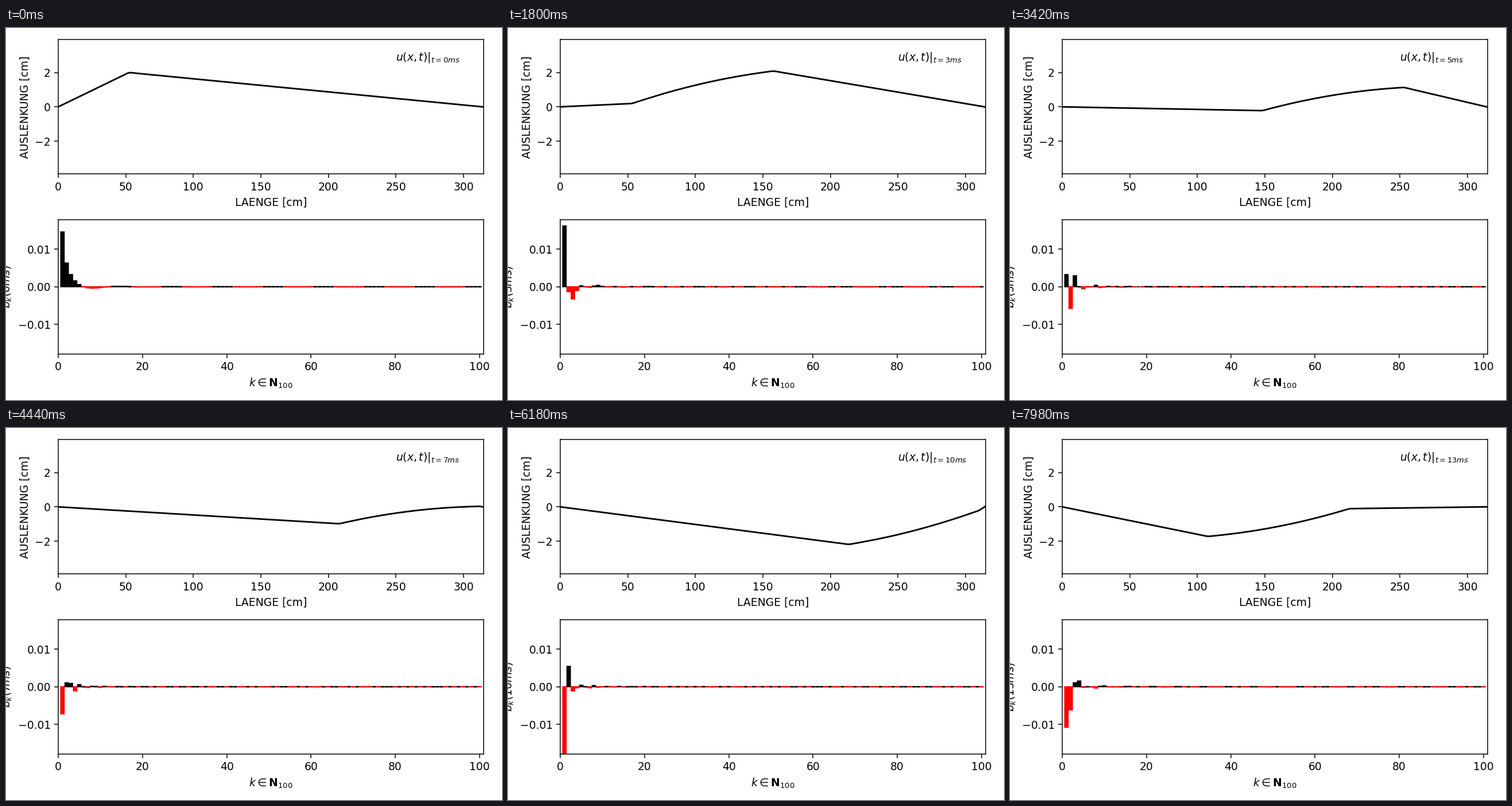
These frames come from a looping animation (864x648 px, 8 s). A matplotlib script:

```python
import numpy as np
import matplotlib.pyplot as plt
from matplotlib.animation import FuncAnimation

# Vibrating string of length pi, struck and plucked at pi / 6
MODES = 100
SPEED = 352.0        # wave speed, m/s
HEIGHT = 0.02        # initial deflection at the kink, m
STRIKE = 5.0         # initial velocity at the kink, m/s
DT = 1e-4            # simulated seconds per step
TICK, HOLD = 20, 3   # ms per frame, frames per step
LOOP = 8000
WIDTH, TALL, DPI = 864, 648, 135

kink = np.pi / 6
k = np.arange(1, MODES + 1)
x = np.arange(316) * 0.01
modes = np.sin(np.outer(x, k))

# Sine coefficients of a triangle of height 1 with its peak at the kink
triangle = 2 * np.sin(k * kink) / (k**2 * kink * (np.pi - kink))
triangle[np.abs(triangle) < 1e-12] = -1e-14
rest = HEIGHT * triangle
swing = STRIKE * triangle / (k * SPEED)
swing[5::6] = 0


def coefficients(step):
    phase = k * SPEED * step * DT
    return rest * np.cos(phase) + swing * np.sin(phase)


def panel(y_top):
    """Axes whose upper edge lies y_top pixels below the stage's top."""
    left, right, height = 91, 832.2, 234.2
    return fig.add_axes([left / WIDTH, 1 - (y_top + height) / TALL,
                         (right - left) / WIDTH, height / TALL])


fig = plt.figure(figsize=(WIDTH / DPI, TALL / DPI), dpi=DPI)
top, bottom = panel(20.25), panel(333.6)

line, = top.plot(100 * x, 0 * x, color="black", lw=1.5)
top.set(xlim=(0, 315), ylim=(-3.92, 3.92),
        xlabel="LAENGE [cm]", ylabel="AUSLENKUNG [cm]")
label = top.text(250, 2.7, "")

bars = bottom.bar(k, rest, width=0.8, linewidth=1, snap=False)
limit = np.hypot(rest[0], swing[0])
bottom.set(xlim=(0, MODES + 1), ylim=(-limit, limit),
           xlabel=r"$k\in\mathbf{N}_{100}$")


def update(frame):
    step = frame // HOLD
    b = coefficients(step)
    line.set_ydata(100 * modes @ b)
    for bar, value in zip(bars, b):
        bar.set_height(value)
        bar.set_color("black" if value > 0 else "red")
    ms = step // 10
    label.set_text(f"$u(x,t)|_{{t={ms}ms}}$")
    bottom.set_ylabel(f"$b_k({ms}ms)$")
    return [line, label, *bars]


anim = FuncAnimation(fig, update, frames=LOOP // TICK, interval=TICK,
                     init_func=lambda: update(0), repeat=True,
                     repeat_delay=0, blit=False)
plt.show()
```
